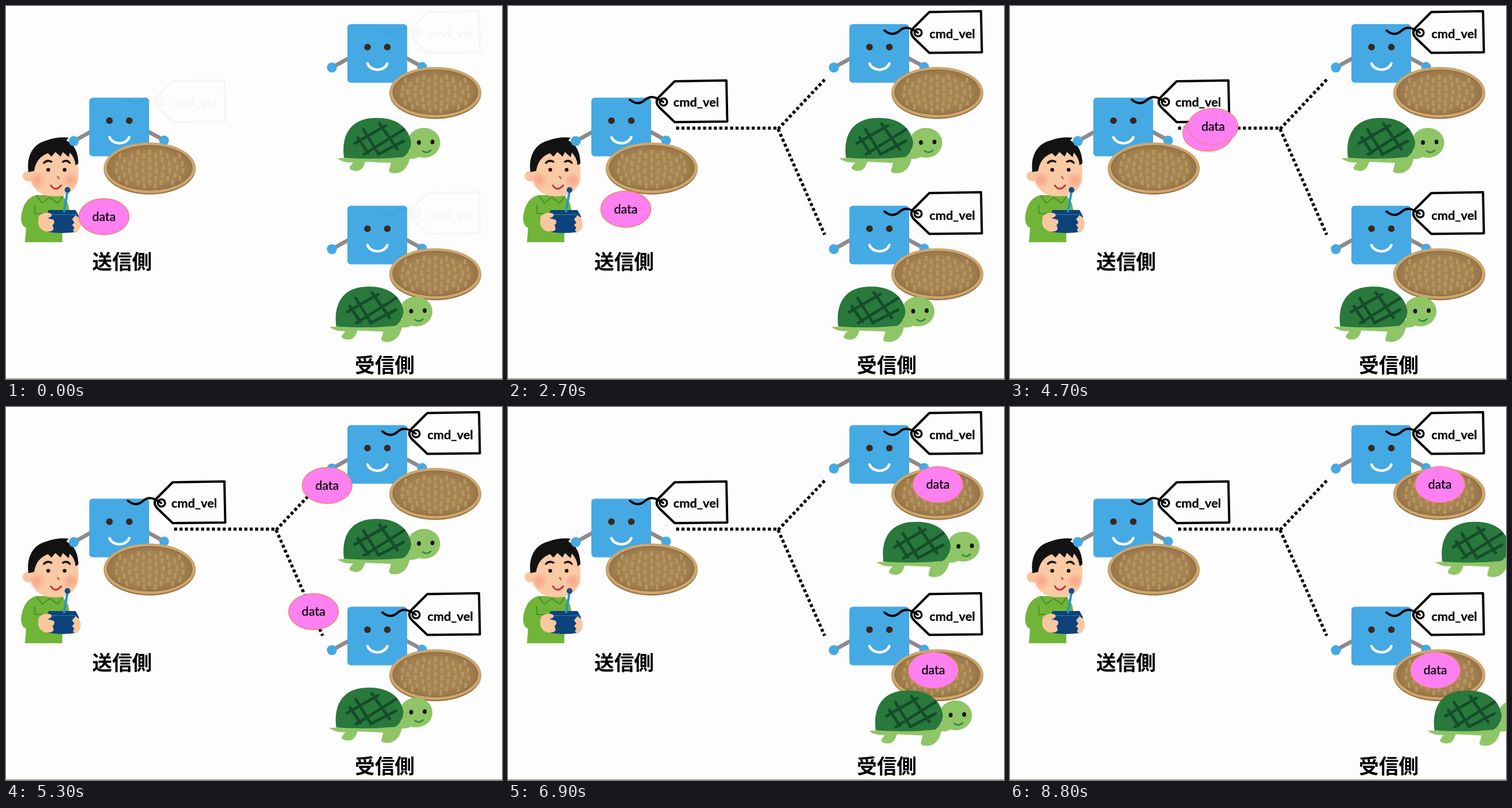
Animation, 863 px wide and 649 px high, one loop 8.9 s. Source, as an HTML page:

```html
<!DOCTYPE html>
<html lang="ja">
<head>
<meta charset="utf-8">
<title>cmd_vel</title>
<style>
  html, body { margin: 0; width: 100%; height: 100%; overflow: hidden; background: #fdfdfd; }
  svg { display: block; width: 863px; height: 649px; }
  .data text { font: 21.5px Lato, sans-serif; text-anchor: middle; stroke: #000; stroke-width: .3; }
  .data ellipse { fill: #fd80f0; stroke: #ee8452; stroke-width: 1.2; }
  .name { font: bold 21.8px Lato, sans-serif; text-anchor: middle; stroke: #000; stroke-width: .3; }
  .label { font: bold 34.7px "Noto Sans CJK JP", "Noto Sans CJK", sans-serif; text-anchor: middle; }
  .line { fill: none; stroke-linecap: round; stroke-linejoin: round; }
</style>
</head>
<body>
<svg viewBox="0 0 863 649">
  <defs>
    <linearGradient id="wipe" gradientUnits="userSpaceOnUse" x1="281" x2="293" y1="0" y2="0">
      <stop offset="0"/><stop offset="1" stop-opacity="0"/>
    </linearGradient>
    <radialGradient id="blush">
      <stop offset="0" stop-color="#f79a82" stop-opacity=".85"/><stop offset="1" stop-color="#f79a82" stop-opacity="0"/>
    </radialGradient>
    <radialGradient id="weave">
      <stop offset=".7" stop-color="#a58453"/><stop offset="1" stop-color="#987649"/>
    </radialGradient>

    <g id="robot">
      <path class="line" d="M147 219L120 234M248 219L274 233" stroke="#8e898d" stroke-width="7"/>
      <g fill="#45a9e4">
        <circle cx="118" cy="235" r="8.7"/><circle cx="275" cy="234" r="8.5"/>
        <rect x="145" y="159.5" width="104" height="102" rx="6"/>
      </g>
      <circle cx="180" cy="199.5" r="5.8" fill="#38291c"/><circle cx="214.5" cy="199.5" r="5.8" fill="#38291c"/>
      <path class="line" d="M180 228C185 242 209 243 214.5 228" stroke="#fff" stroke-width="4.5"/>
    </g>

    <g id="basket">
      <ellipse cy="1" rx="80" ry="45" fill="#9a7546"/>
      <ellipse cy="-.5" rx="79.8" ry="44" fill="#cda66d"/>
      <ellipse cy="-.5" rx="74.5" ry="39.5" fill="#8a683f"/>
      <ellipse cy="-.5" rx="73.5" ry="38.5" fill="url(#weave)"/>
      <g id="strands" class="line" stroke="#b6965f" stroke-width="4.5" style="stroke-linecap:butt"></g>
    </g>

    <g id="tag">
      <path class="line" d="M290 131L380 129.5L381.5 201L290 202L264 177Q254 167 263 158Z" stroke="#000" stroke-width="4"/>
      <circle cx="270.5" cy="167" r="6.3" fill="none" stroke="#000" stroke-width="3.4"/>
      <path class="line" d="M212 163C223 172 231 170 239 163S256 157 270 167" stroke="#000" stroke-width="3.8"/>
    </g>

    <g id="turtle">
      <g fill="#8fc566">
        <path d="M576 265L594 264L600 256L710 252L724 258Q716 267 702 266C700 279 691 291 677 291Q664 291 667 284L670 273L625 271C622 280 619 287 608 287Q596 286 598 280L604 272Q589 274 576 265Z"/>
        <ellipse cx="727" cy="238" rx="28.5" ry="26"/>
      </g>
      <path d="M588 264C583 224 600 197 638 195C675 192 700 208 705 237Q704 254 691 263Q640 268 588 264Z" fill="#29783c"/>
      <path class="line" d="M607 239L661 208M623 258L692 215M648 258L692 235M622 215L648 257M650 205L681 249M612 229L630 256" stroke="#154c2a" stroke-width="5"/>
      <ellipse cx="718.5" cy="237.5" rx="3.4" ry="4" fill="#111"/><ellipse cx="742" cy="236.5" rx="3.4" ry="4" fill="#111"/>
      <path class="line" d="M725 252Q732 258 739 251" stroke="#2f8a40" stroke-width="2.5"/>
    </g>

    <g id="data" class="data">
      <ellipse rx="43.5" ry="31.5"/><text y="7">data</text>
    </g>
  </defs>

  <path d="M0 648.5H863" stroke="#85856c"/>

  <g id="man">
    <path d="M53 329Q32 334 27 362Q24 381 35 386L33 411H98V390L116 386L108 344Q102 331 92 329Z" fill="#70b537"/>
    <path class="line" d="M54 331L63 343L76 333L90 343L99 331M50 347V361H62" stroke="#4c9130" stroke-width="2.2"/>
    <circle cx="38" cy="296" r="9" fill="#f9c49d"/>
    <path d="M41 271C45 244 121 241 125 275C129 305 123 331 84 331C51 331 39 310 41 271Z" fill="#facaa4"/>
    <circle cx="54" cy="303" r="16" fill="url(#blush)"/><circle cx="113" cy="303" r="15" fill="url(#blush)"/>
    <path d="M39 289C35 261 47 240 70 234Q90 227 109 229L105 234Q125 243 126 274L121 277Q120 264 111 255L109 263L99 254L95 262L86 254L79 262L73 256Q52 264 49 287Z" fill="#121212"/>
    <path class="line" d="M66 273Q72 267 79 271M99 271Q106 267 111 273" stroke="#19130f" stroke-width="3.5"/>
    <circle cx="73.5" cy="285" r="3.3" fill="#20160f"/><circle cx="102" cy="285" r="3.3" fill="#20160f"/>
    <path class="line" d="M90 297L92 300" stroke="#d84c43" stroke-width="2.5"/>
    <path class="line" d="M78 312Q86 324 96 312" stroke="#c92f43" stroke-width="3"/>
    <path d="M74 355H121L127 366L123 393Q97 397 73 393L70 366Z" fill="#0d427b"/>
    <path class="line" d="M74 363H122" stroke="#20629b" stroke-width="2"/>
    <path class="line" d="M101 357L107 323" stroke="#2593d3" stroke-width="4"/>
    <circle cx="107" cy="320" r="5" fill="#104f8b"/>
    <path d="M57 366Q66 357 78 361Q83 366 72 369L83 372Q86 378 81 381L83 388Q80 394 68 392Q55 387 56 374Z" fill="#f9c79f"/>
    <path d="M121 364Q130 369 130 379Q130 391 120 394Q114 390 119 386L115 381L119 377L115 371Z" fill="#f9c79f"/>
  </g>

  <use href="#robot"/>
  <use href="#robot" x="449" y="-128"/>
  <use href="#robot" x="449" y="188"/>

  <g id="tags">
    <use href="#tag"/><text class="name" x="327.5" y="174.5">cmd_vel</text>
    <use href="#tag" x="443" y="-120.5"/><text class="name" x="773" y="55.5">cmd_vel</text>
    <use href="#tag" x="443" y="194.5"/><text class="name" x="773" y="371.5">cmd_vel</text>
  </g>

  <path d="M292.5 212.5H470M470 214L553 126M470 214L551 398" fill="none" stroke="url(#wipe)" stroke-width="5.4" stroke-dasharray="5.2 4.2"/>

  <use href="#basket" x="250" y="282"/>
  <use href="#basket" x="747" y="150.5"/>
  <use href="#basket" x="747" y="466"/>

  <use id="lower" href="#data"/>
  <use id="upper" href="#data"/>

  <g id="turtles">
    <use href="#turtle"/>
    <use href="#turtle" x="-13.5" y="293.5"/>
  </g>

  <text class="label" x="202" y="458">送信側</text>
  <text class="label" x="659" y="637.5">受信側</text>
</svg>

<script>
const LOOP = 8900, STEP = 100, MOVE = 2000;
const SVG = "http://www.w3.org/2000/svg";
const $ = id => document.getElementById(id);
const clamp = v => Math.min(1, Math.max(0, v));
const ramp = (t, start, length) => clamp((t - start) / length);
const smooth = p => p * p * (3 - 2 * p);

function makePath(d) {
  const path = document.createElementNS(SVG, "path");
  path.setAttribute("d", d);
  const length = path.getTotalLength();
  return p => path.getPointAtLength(length * p);
}

function place(el, x, y) {
  el.setAttribute("transform", `translate(${x} ${y})`);
}

// Short upright strands, bowed outward toward the basket's sides.
function weave() {
  let d = "";
  for (let row = -3; row <= 3; row++) {
    for (let col = -6; col <= 6; col++) {
      const y = row * 13 + (col % 2 ? 5 : -1);
      const x = col * 12 * (1 - Math.abs(y) / 150);
      if ((x / 68) ** 2 + (y / 33) ** 2 > 1) continue;
      const lean = -x * y / 2600;
      d += `M${x - lean} ${y - 4.5}L${x + lean} ${y + 4.5}`;
    }
  }
  const strands = document.createElementNS(SVG, "path");
  strands.setAttribute("d", d);
  $("strands").append(strands);
}

const toBasket = makePath("M170.5 366.5Q252 347 250 266");
const couriers = [
  { el: $("upper"), start: 4090, path: makePath("M250 266C285 232 320 211 361 209S445 216 470 212S530 148 560 136S690 135 748 135") },
  { el: $("lower"), start: 4210, path: makePath("M250 266C280 241 305 226 339 222S450 200 470 214S526 350 555 395S680 458 740 458") }
];

function draw(t) {
  $("tags").setAttribute("opacity", ramp(t, -15, 500));

  const edge = 293 + 185 * ramp(t, 500, 500) + 92 * ramp(t, 1000, 450);
  $("wipe").setAttribute("x1", edge - 12);
  $("wipe").setAttribute("x2", edge);

  for (const { el, start, path } of couriers) {
    const spot = t < start
      ? toBasket(smooth(ramp(t, 2030, MOVE)))
      : path(smooth(ramp(t, start, 6100 - start)));
    place(el, spot.x, spot.y);
  }

  const walking = t >= 6050;
  const walk = smooth(ramp(t, 6050, MOVE));
  place($("turtles"), walking ? 2.5 + 161.5 * walk : 0, walking ? 5 : 0);
}

function tick() {
  const t = performance.now() % LOOP;
  draw(Math.floor(t / STEP) * STEP);
  requestAnimationFrame(tick);
}

weave();
tick();
</script>
</body>
</html>
```
